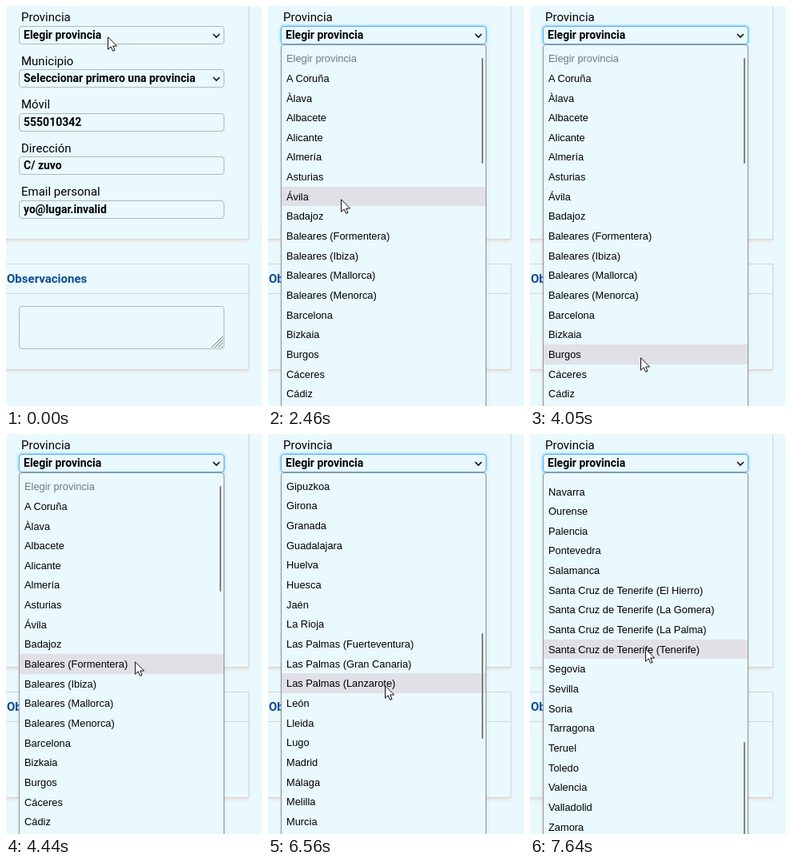
These frames come from a looping animation (320 by 500 pixels, 8 s). An HTML page:

```html
<!DOCTYPE html>
<html lang="es">
<head>
<meta charset="utf-8">
<title>Formulario</title>
<style>
  html, body { margin: 0; width: 100%; height: 100%; overflow: hidden; background: #e9f9fe; }
  #stage { position: absolute; left: 0; top: 0; width: 320px; height: 500px; overflow: hidden;
    background: #e9f9fe; color: #000; font-family: Roboto, sans-serif; cursor: default; }
  #stage div, #stage svg { position: absolute; box-sizing: border-box; white-space: nowrap; }
  .panel { left: -20px; width: 324px; border: 1px solid #d2d7d8; box-shadow: 0 3px 4px -1px #eadcd6; }
  .label { left: 19px; font-size: 15px; line-height: 20px; }
  .field { left: 16px; width: 257px; height: 23px; padding-left: 5px; border: 1px solid #b4b8ba;
    border-radius: 4px; font-size: 14px; font-weight: 700; line-height: 21px; }
  .field svg { left: 241px; top: 8px; }
  .focus { border-color: #58aef3; box-shadow: 0 0 3px 1px #8fd0fb; }
  #ghost { left: 16px; top: 0; fill: #fcf8e2; overflow: hidden; }
  #popup { left: 16px; top: 48px; width: 257px; height: 470px; background: #e9f9fe;
    border: 1px solid #969390; border-radius: 4px; box-shadow: 0 1px 4px rgba(120, 110, 110, .2); }
  #clip { left: 0; top: 4px; width: 255px; height: 448px; overflow: hidden; }
  #clip div { left: 0; width: 255px; padding-left: 6px;
    font: 12.85px/25px "Liberation Sans", Arial, sans-serif; }
  #clip div:first-child { color: #74797c; }
  #clip .on { background: #e0e0e6; }
  #thumb { left: 250px; width: 2px; height: 132px; border-radius: 1px; background: #7f8284; }
</style>
</head>
<body>
<div id="stage">
  <svg id="ghost" width="257" height="500"></svg>
  <div class="panel" style="top:-20px;height:312px"></div>
  <div class="panel" style="top:322px;height:133px"></div>
  <div style="left:0;top:359px;width:303px;height:1px;background:#d2d7d8"></div>
  <div style="left:1px;top:331px;font:700 15px/20px Roboto,sans-serif;color:#0b4c96">Observaciones</div>
  <div class="field" style="top:375px;height:54px"></div>
  <svg style="left:256px;top:412px" width="16" height="16" stroke="#70777a" fill="none">
    <path d="M1 15L15 1M5 15L15 5M9 15L15 9M13 15L15 13"/>
  </svg>
  <div id="form"></div>
  <div id="popup"><div id="clip"></div><div id="thumb"></div></div>
  <svg id="mouse" style="left:0;top:0" width="13" height="20">
    <path d="M.5 .8V16.3L4.2 12.9L6.6 18.4L9 17.3L6.7 12H11.6Z" fill="#fff" stroke="#111"/>
  </svg>
</div>
<script>
const $ = id => document.getElementById(id);
const LOOP = 8000, STEP = 135;
const PITCH = 24.65, LIST_TOP = 53.2, FIELD_PITCH = 54.4;
const FOCUS_AT = 1510, OPEN_AT = 1940;

const fields = [
  ["Provincia", "Elegir provincia", true],
  ["Municipio", "Seleccionar primero una provincia", true],
  ["Móvil", "555010342"],
  ["Dirección", "C/ zuvo"],
  ["Email personal", "yo@lugar.invalid"],
];

const options = ("Elegir provincia,A Coruña,Àlava,Albacete,Alicante,Almería,Asturias,Ávila,Badajoz," +
  "Baleares (Formentera),Baleares (Ibiza),Baleares (Mallorca),Baleares (Menorca),Barcelona,Bizkaia," +
  "Burgos,Cáceres,Cádiz,Cantabria,Castellón,Ceuta,Ciudad Real,Córdoba,Cuenca,Gipuzkoa,Girona,Granada," +
  "Guadalajara,Huelva,Huesca,Jaén,La Rioja,Las Palmas (Fuerteventura),Las Palmas (Gran Canaria)," +
  "Las Palmas (Lanzarote),León,Lleida,Lugo,Madrid,Málaga,Melilla,Murcia,Navarra,Ourense,Palencia," +
  "Pontevedra,Salamanca,Santa Cruz de Tenerife (El Hierro),Santa Cruz de Tenerife (La Gomera)," +
  "Santa Cruz de Tenerife (La Palma),Santa Cruz de Tenerife (Tenerife),Segovia,Sevilla,Soria," +
  "Tarragona,Teruel,Toledo,Valencia,Valladolid,Zamora,Zaragoza").split(",");

// Key points: time, then values. Travel between them is linear, in held steps.
const pointer = [
  [0, 127, 38], [270, 131, 38], [2060, 131, 38], [2460, 91, 241], [3480, 110, 317],
  [3750, 118, 336], [3900, 123, 434], [4050, 138, 439], [4440, 161, 284], [5300, 161, 284],
  [5550, 150, 268], [5740, 150, 268], [6260, 147, 312], [6560, 146, 314], [7090, 146, 314],
  [7220, 144, 229], [7640, 144, 268],
];
const wheel = [[0, 0], [4700, 0], [4840, 592], [6560, 592], [7070, 1029]];

function sample(keys, t) {
  const next = keys.findIndex(k => k[0] > t);
  if (next < 0) return keys.at(-1).slice(1);
  if (next === 0) return keys[0].slice(1);
  const [a, b] = [keys[next - 1], keys[next]];
  const steps = Math.max(1, Math.round((b[0] - a[0]) / STEP));
  const p = Math.floor((t - a[0]) / (b[0] - a[0]) * steps) / steps;
  return a.slice(1).map((v, i) => v + (b[i + 1] - v) * p);
}

// Pale slanted streaks that flash just before the list opens
function streaks() {
  let seed = 7;
  const rand = (min, max) => {
    seed = seed * 16807 % 2147483647;
    return min + (max - min) * seed / 2147483647;
  };
  let d = "";
  for (let band = 0; band < 5; band++) {
    const y = 49 + FIELD_PITCH * band;
    for (let x = rand(0, 30); x < 257; x += rand(85, 125)) {
      const w = rand(40, 85), h = rand(20, 42);
      d += `M${x} ${y}h${w}l${-h} ${h}h${-w}Z`;
    }
  }
  for (let y = 379; y < 425; y += 8) d += `M1 ${y}h255v4h-255Z`;
  return `<path d="${d}M244 458h17v42h-11Z"/>`;
}
$("ghost").innerHTML = streaks();

const chevron = '<svg width="10" height="7" fill="none" stroke="#111" stroke-width="1.6"><path d="M1 1L5 5L9 1"/></svg>';
$("form").innerHTML = fields.map(([label, value, select], i) =>
  `<div class="label" style="top:${Math.round(4.3 + FIELD_PITCH * i)}px">${label}</div>
   <div class="field" style="top:${Math.round(25 + FIELD_PITCH * i)}px">${value}${select ? chevron : ""}</div>`).join("");
const province = document.querySelector("#form .field");

const rows = options.map(text => {
  const row = document.createElement("div");
  row.textContent = text;
  return $("clip").appendChild(row);
});

function draw(t) {
  const [x, y] = sample(pointer, t).map(Math.round);
  const [scroll] = sample(wheel, t);
  const open = t >= OPEN_AT;
  const hovered = Math.floor((y - LIST_TOP + scroll) / PITCH);
  const rowTop = i => Math.round(LIST_TOP + PITCH * i - scroll) - 53;

  province.classList.toggle("focus", t >= FOCUS_AT);
  $("ghost").style.display = t >= FOCUS_AT && !open ? "" : "none";
  $("popup").style.display = open ? "" : "none";
  rows.forEach((row, i) => {
    row.style.top = rowTop(i) + "px";
    row.style.height = rowTop(i + 1) - rowTop(i) + "px";
    row.classList.toggle("on", i > 0 && i === hovered);
  });
  $("thumb").style.top = Math.round(16 + scroll * .3105) + "px";
  $("mouse").style.transform = `translate(${x}px, ${y}px)`;
}

const start = performance.now();
function tick() {
  draw((performance.now() - start) % LOOP);
  requestAnimationFrame(tick);
}
tick();
</script>
</body>
</html>
```
